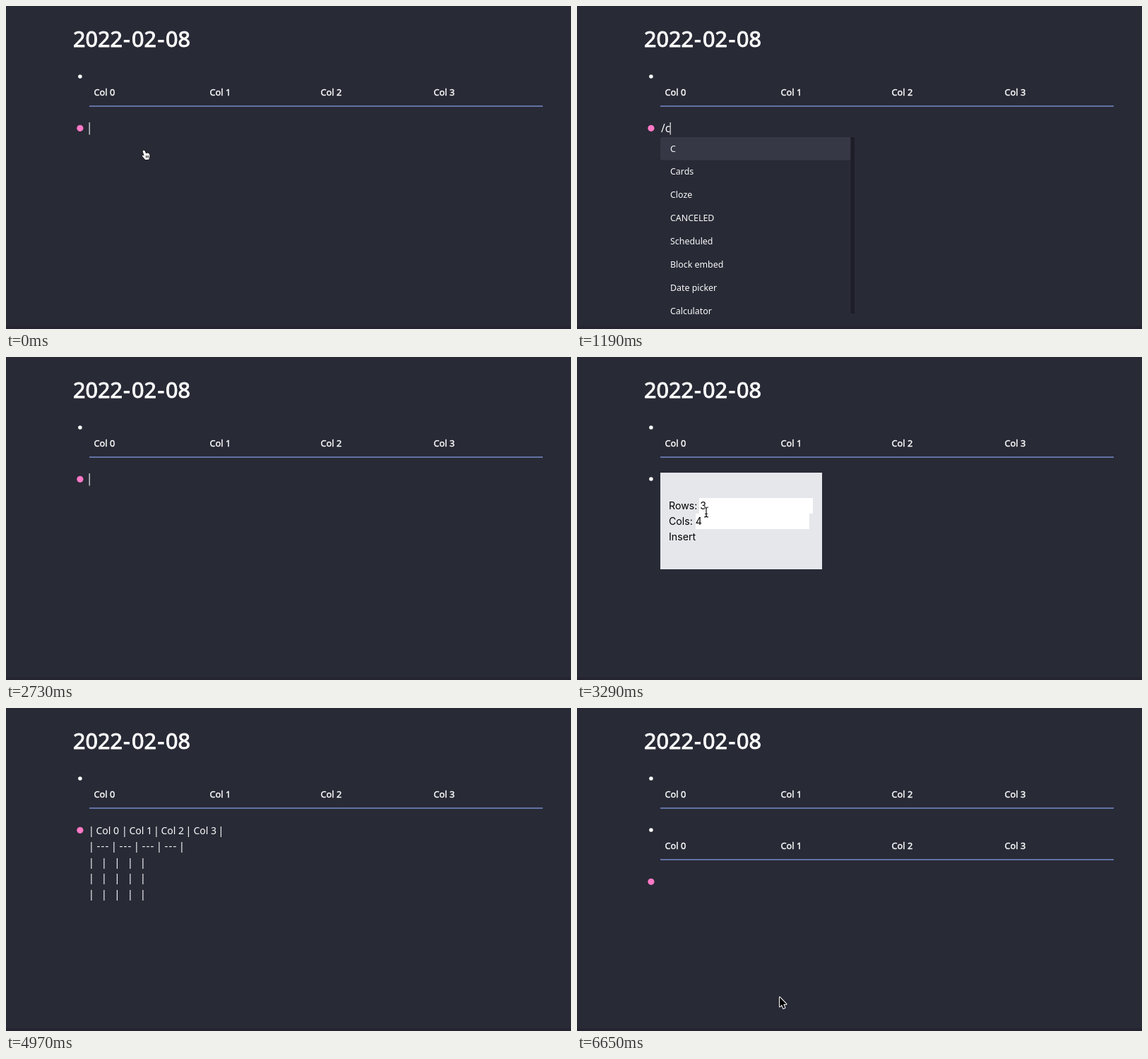
An HTML page with a canvas for the animation above (6860 ms loop, 800 by 458 pixels).

```html
<!DOCTYPE html>
<html lang="en">
<head>
<meta charset="utf-8">
<title>Insert table</title>
<style>
  html, body { margin: 0; width: 100%; height: 100%; overflow: hidden; background: #282a36; }
  canvas { display: block; width: 800px; height: 458px; }
</style>
</head>
<body>
<canvas id="stage" width="800" height="458"></canvas>
<script>
const ctx = document.getElementById('stage').getContext('2d');
const LOOP = 6860, STEP = 70;
const SANS = '"Noto Sans", sans-serif', UI = 'Inter, sans-serif';
const WHITE = '#fbfbfa', PINK = '#ff79c6';

const TITLE = [[95, '2022'], [166, '-'], [178, '02'], [214.5, '-'], [226, '08']];
const COLS = [[125, 'Col 0'], [289, 'Col 1'], [446, 'Col 2'], [606, 'Col 3']];

const MENUS = [
  { at: 910, typed: '/', caret: 125, items: ['Page reference', 'Page embed', 'Block reference',
    'Block embed', 'Link', 'Image link', 'Date picker', 'Calculator'] },
  { at: 1050, typed: '/c', caret: 131.6, items: ['C', 'Cards', 'Cloze', 'CANCELED', 'Scheduled',
    'Block embed', 'Date picker', 'Calculator'] },
  { at: 1330, typed: '/cr', caret: 138, items: ['Create Table', 'Cards', 'Current time',
    'Block reference', 'Date picker', 'Calculator'] },
  { at: 1470, typed: '/cre', caret: 145, items: ['Create Table', 'Current time', 'Block reference'] }
];
const MENU_END = 2100, POPUP = 2870, INSERT = 4270, RENDER = 5110;

// Spans during which the text caret is lit
const CARET_ON = [[0, 420], [910, 1960], [2100, POPUP], [RENDER, 5600], [6090, 6650]];

// Pointer keys: time, x, y
const POPUP_PATH = [[3080, 197, 212], [3290, 183, 220], [3360, 183, 220], [3920, 159, 251], [4830, 159, 251]];
const EXIT_PATH = [[5740, 163, 258], [6160, 272, 431], [6440, 287, 410], [LOOP, 287, 410]];

function rect(x, y, w, h, color) {
  ctx.fillStyle = color;
  ctx.fillRect(x, y, w, h);
}

function dot(x, y, r, color) {
  ctx.fillStyle = color;
  ctx.beginPath();
  ctx.arc(x, y, r, 0, Math.PI * 2);
  ctx.fill();
}

// "heavy" thickens the strokes to a medium weight
function text(str, x, y, size, { heavy = 0, family = SANS, color = WHITE, align = 'left' } = {}) {
  ctx.font = `${size}px ${family}`;
  ctx.textAlign = align;
  ctx.fillStyle = ctx.strokeStyle = color;
  ctx.fillText(str, x, y);
  if (heavy) {
    ctx.lineWidth = heavy;
    ctx.lineJoin = 'round';
    ctx.strokeText(str, x, y);
  }
}

function outline(points, x, y, fill, stroke, width) {
  ctx.beginPath();
  points.forEach(([px, py]) => ctx.lineTo(x + px, y + py));
  ctx.closePath();
  ctx.lineJoin = 'round';
  ctx.lineWidth = width;
  ctx.strokeStyle = stroke;
  ctx.stroke();
  ctx.fillStyle = fill;
  ctx.fill();
}

function arrow(x, y) {
  outline([[0, 0], [0, 13.5], [3, 10.8], [5.2, 16], [7.5, 15], [5.3, 10], [9.5, 10]],
    x, y, '#000', '#fff', 2);
}

function hand(x, y) {
  outline([[2.2, 0.5], [4, 1.2], [5.6, 5], [8, 4.6], [10.2, 5.2], [11, 8], [10.4, 11], [10, 13.5],
    [4.8, 14], [2.6, 11.4], [0.2, 8.6], [1, 7.4], [3.2, 8.4], [1, 2]], x, y, '#fff', '#111', 1.4);
  ctx.lineWidth = 0.8;
  ctx.beginPath();
  for (const dx of [5.8, 7.4, 9]) {
    ctx.moveTo(x + dx, y + 8);
    ctx.lineTo(x + dx, y + 11.5);
  }
  ctx.stroke();
}

function beam(x, y) {
  const parts = () => {
    ctx.beginPath();
    ctx.moveTo(x - 3, y - 7);
    ctx.quadraticCurveTo(x, y - 7, x, y - 5);
    ctx.quadraticCurveTo(x, y - 7, x + 3, y - 7);
    ctx.moveTo(x, y - 5.5);
    ctx.lineTo(x, y + 5.5);
    ctx.moveTo(x - 3, y + 7);
    ctx.quadraticCurveTo(x, y + 7, x, y + 5);
    ctx.quadraticCurveTo(x, y + 7, x + 3, y + 7);
    ctx.moveTo(x - 1.8, y + 2.5);
    ctx.lineTo(x + 1.8, y + 2.5);
    ctx.stroke();
  };
  ctx.strokeStyle = '#fff';
  ctx.lineWidth = 2.6;
  parts();
  ctx.strokeStyle = '#111';
  ctx.lineWidth = 1.2;
  parts();
}

function along(path, t) {
  const i = path.findIndex(key => key[0] > t);
  const [t0, x0, y0] = path[i - 1], [t1, x1, y1] = path[i];
  const p = (t - t0) / (t1 - t0), e = p * p * (3 - 2 * p);
  return [x0 + (x1 - x0) * e, y0 + (y1 - y0) * e];
}

const within = (path, t) => t >= path[0][0] && t < path[path.length - 1][0];

function table(y) {
  dot(104.9, y, 2.8, WHITE);
  COLS.forEach(([x, label]) => text(label, x - 0.5, y + 27, 12.8, { heavy: 0.45 }));
  rect(118, y + 41, 642, 2, '#6272a4');
}

function menu({ typed, items }) {
  text(typed, 119, 179, 15.5);
  ctx.fillStyle = '#363846';
  ctx.beginPath();
  ctx.roundRect(118, 186, 269.5, 32.5, 3);
  ctx.fill();
  if (items.length > 7) rect(387.5, 186, 5.5, 250, '#1d1e28');
  items.forEach((item, i) => text(item, 132, 206.5 + i * 32.95, 12.4));
}

function popup() {
  const black = { family: UI, color: '#000' };
  rect(118, 164, 229, 137, '#e5e7eb');
  rect(173, 200, 161, 22, '#fff');
  rect(168, 222, 161, 22, '#fff');
  text('Rows: 3', 130, 216, 14.2, black);
  text('Cols: 4', 130, 238, 14.2, black);
  text('Insert', 130, 260, 14.2, black);
}

function bars(xs, y) {
  xs.forEach(x => text('|', x, y, 15, { align: 'center' }));
}

function markdown() {
  bars([121, 168, 213, 258.5, 304.5], 178.5);
  [128, 175, 220, 266].forEach((x, i) => text('Col ' + i, x - 0.5, 178.7, 14));
  bars([121, 153, 185, 217, 249], 201);
  for (let i = 0; i < 12; i++) {
    text('-', 131 + (i / 3 | 0) * 32 + (i % 3) * 5.9, 201, 15, { align: 'center' });
  }
  for (let row = 0; row < 3; row++) bars([121, 139, 157.5, 176, 194], 223.5 + row * 22.8);
}

function pointer(t) {
  if (t < 910) {
    hand(192.5, 204);
  } else if (within(POPUP_PATH, t)) {
    const [x, y] = along(POPUP_PATH, t);
    (y < 244 ? beam : arrow)(x, y);
  } else if (within(EXIT_PATH, t)) {
    arrow(...along(EXIT_PATH, t));
  }
}

function draw(t) {
  const open = t < MENU_END ? MENUS.filter(m => m.at <= t).pop() : null;
  const asking = t >= POPUP && t < INSERT;
  const rendered = t >= RENDER;

  rect(0, 0, 800, 458, '#282a36');
  rect(0, 454, 800, 4, '#242531');
  TITLE.forEach(([x, part]) => text(part, x, 58, 30.6, { heavy: 1 }));
  table(100);

  if (rendered) table(173);
  if (asking) {
    dot(104.9, 173, 2.8, WHITE);
    popup();
  } else {
    dot(104.9, rendered ? 246.3 : 173.3, 4.6, PINK);
  }
  if (open) menu(open);
  if (t >= INSERT && !rendered) markdown();

  if (CARET_ON.some(([from, to]) => t >= from && t < to)) {
    rect(open ? open.caret : 117.6, rendered ? 238 : 165, 1.1, 17.5, WHITE);
  }
  pointer(t);
}

const start = performance.now();
function tick() {
  const t = (performance.now() - start) % LOOP;
  draw(Math.floor(t / STEP) * STEP);
  requestAnimationFrame(tick);
}
tick();
</script>
</body>
</html>
```
